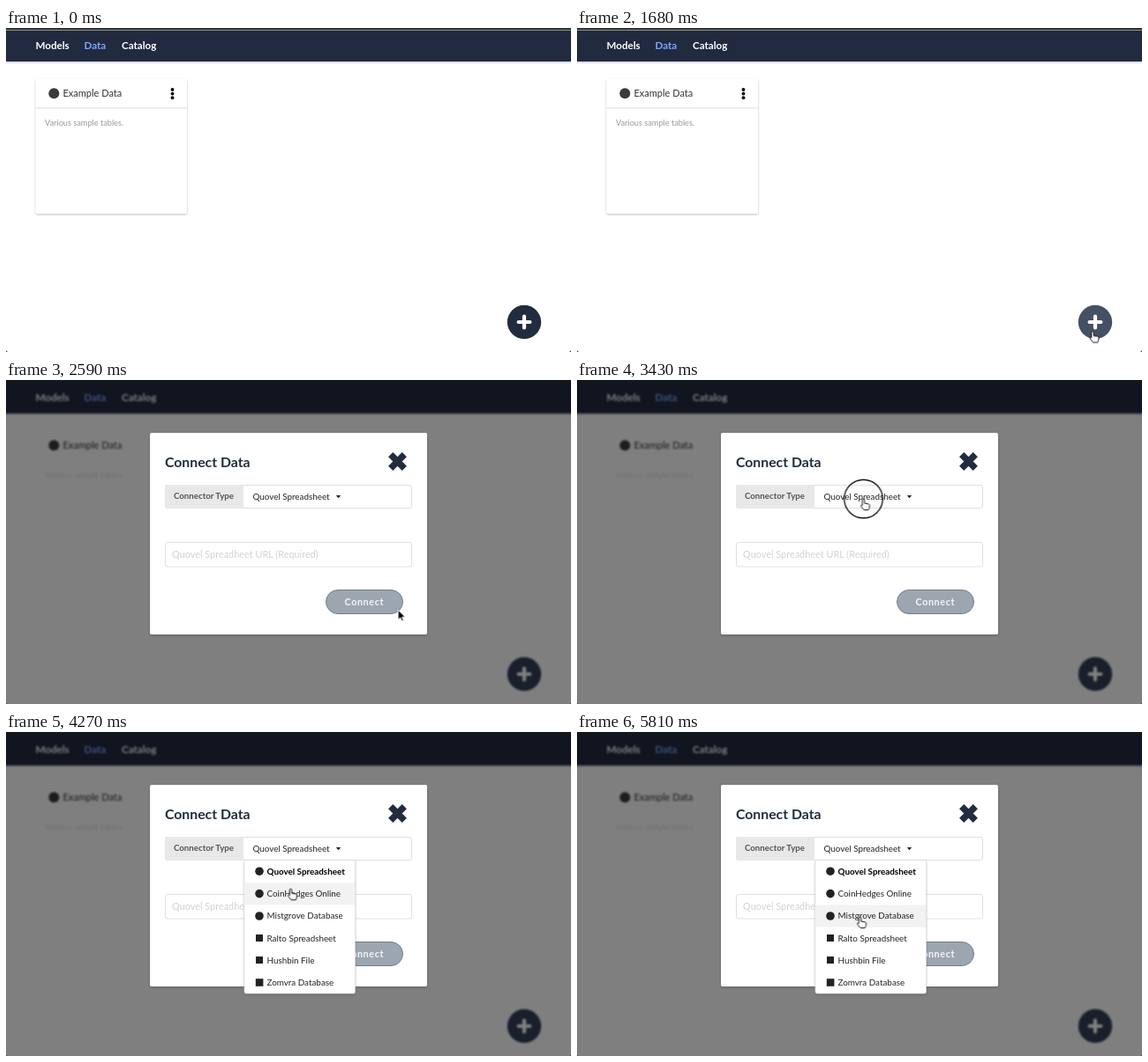
An HTML page for the animation above (6.02 s loop, 640 by 368 pixels).

```html
<!DOCTYPE html>
<html lang="en">
<head>
<meta charset="utf-8">
<title>Connect Data</title>
<style>
  html, body { margin: 0; width: 100%; height: 100%; overflow: hidden; background: #333; }
  svg { display: block; width: 640px; height: 368px; border-radius: 0 0 3px 3px; }
  text { font: 9.85px Lato, sans-serif; fill: #222; }
  .bold { font-weight: 700; }
  .nav { font-size: 11.6px; fill: #fff; }
  .title { font-size: 11px; fill: #333; }
  .note { font-size: 9.2px; fill: #999; }
  .heading { font-size: 15.8px; fill: #212c3f; }
  .label { font-size: 9.7px; fill: #555; }
  .hint { font-size: 10.9px; fill: #d2d2d2; }
  .action { font-size: 10.8px; letter-spacing: .6px; fill: #f4f5f6; }

  /* One shared 6020 ms clock; "cut" marks hard changes. */
  .cut, .move { animation: 6020ms infinite; }
  .cut { animation-timing-function: step-end; }
  .page { animation-name: blur; }
  .lit { animation-name: lit; }
  .note { animation-name: fade-note; }
  .modal { animation-name: modal; }
  .add { animation-name: add; fill: #212c3f; }
  .menu { animation-name: menu; transform-origin: 0 145px; }
  .cursor { animation-name: path; }
  .shown { animation-name: shown; }
  .arrow { animation-name: arrow; }
  .hand { animation-name: hand; }
  .ring { animation-name: ring; }
  .row { fill: #f2f2f2; opacity: 0; }
  .row1 { animation-name: row1; }
  .row2 { animation-name: row2; }
  .row3 { animation-name: row3; }

  @keyframes blur { 0% { filter: none } 29.06%, 100% { filter: blur(.9px) } }
  @keyframes lit { 0% { opacity: 1 } 29.06%, 100% { opacity: 0 } }
  @keyframes fade-note { 0% { opacity: 1 } 29.06%, 100% { opacity: .3 } }
  @keyframes modal { 0% { opacity: 0 } 29.06%, 100% { opacity: 1 } }
  @keyframes add {
    0%, 18.8% { fill: #212c3f }
    23.2%, 29% { fill: #445064 }
    29.06%, 100% { fill: #324056 }
  }
  @keyframes menu {
    0%, 58.8% { opacity: 0; transform: scaleY(.1) }
    61.6%, 100% { opacity: 1; transform: none }
  }
  @keyframes path {
    0%, 15.1% { transform: translate(604px, 361px) }
    17.44% { transform: translate(589px, 353px) }
    19.77% { transform: translate(586px, 349px) }
    23.2%, 36% { transform: translate(584px, 344.5px); animation-timing-function: ease-in }
    43% { transform: translate(445px, 262px); animation-timing-function: cubic-bezier(.2, .4, .5, 1) }
    55.8%, 63.9% { transform: translate(324.5px, 135px); animation-timing-function: ease-in }
    70.93% { transform: translate(322.5px, 178px); animation-timing-function: ease-out }
    79.07%, 82.5% { transform: translate(321px, 214px) }
    88.37%, 90.7% { transform: translate(320px, 212px) }
    93% { transform: translate(320.5px, 211px) }
    96.5%, 100% { transform: translate(320.5px, 210px) }
  }
  @keyframes shown { 0% { opacity: 0 } 15.1%, 100% { opacity: 1 } }
  @keyframes arrow { 0% { opacity: 1 } 19.76% { opacity: 0 } 29.06% { opacity: 1 } 52.3%, 100% { opacity: 0 } }
  @keyframes hand { 0% { opacity: 0 } 19.76% { opacity: 1 } 29.06% { opacity: 0 } 52.3%, 100% { opacity: 1 } }
  @keyframes ring {
    0% { opacity: 0 }
    25.57% { opacity: 1 }
    27.9% { opacity: 0 }
    56.97% { opacity: 1 }
    59.3%, 100% { opacity: 0 }
  }
  @keyframes row1 { 0% { opacity: 0 } 66.4% { opacity: 1 } 69.8%, 100% { opacity: 0 } }
  @keyframes row2 { 0% { opacity: 0 } 69.8% { opacity: 1 } 74.4%, 100% { opacity: 0 } }
  @keyframes row3 { 0% { opacity: 0 } 74.4%, 100% { opacity: 1 } }
</style>
</head>
<body>
<svg viewBox="0 0 640 368">
  <defs>
    <filter id="soft" x="-10%" y="-10%" width="120%" height="120%">
      <feDropShadow dx="0" dy="1" stdDeviation="1.3" flood-color="#22224a" flood-opacity=".3"/>
    </filter>
  </defs>

  <g class="page cut">
    <rect x="-10" y="-10" width="660" height="388" fill="#fff"/>
    <g filter="url(#soft)">
      <rect x="-10" y="-10" width="660" height="48" fill="#212c3f"/>
    </g>
    <rect x="-10" y="-10" width="660" height="12" fill="#29332f"/>
    <rect class="lit cut" y="2" width="640" height="1" fill="#8f9284"/>
    <text class="nav bold" x="33.5" y="24">Models</text>
    <text class="nav bold" x="88.5" y="24" style="fill:#78a6ff">Data</text>
    <text class="nav bold" x="131" y="24">Catalog</text>

    <g class="lit cut">
      <rect x="33.5" y="57.5" width="171.5" height="153.5" rx="3" fill="#fff" filter="url(#soft)"/>
      <path d="M33.5 91H205" stroke="#d9d9ec"/>
      <g fill="#000">
        <circle cx="188.5" cy="70" r="1.9"/>
        <circle cx="188.5" cy="74.6" r="1.9"/>
        <circle cx="188.5" cy="79.2" r="1.9"/>
      </g>
    </g>
    <circle cx="54.3" cy="74.2" r="6" fill="#3a3a3a"/>
    <text class="title" x="64.5" y="78">Example Data</text>
    <text class="note cut" x="44" y="111">Various sample tables.</text>

    <circle class="add move" cx="587" cy="334" r="19.2"/>
    <path d="M580.6 334H593.4M587 327.6V340.4" stroke="#fff" stroke-width="4.2" stroke-linecap="round"/>
  </g>

  <g class="modal cut">
    <rect width="640" height="368" opacity=".5"/>
    <rect x="163" y="60" width="314" height="229" rx="2" fill="#fff" filter="url(#soft)"/>
    <text class="heading bold" x="180" y="98.7">Connect Data</text>
    <path d="M435.7 84.7L451.3 100.3M451.3 84.7L435.7 100.3" stroke="#212c3f" stroke-width="7.4"/>

    <g fill="none" stroke="#dfdfdf">
      <rect x="180.5" y="119.5" width="279" height="26" rx="2.5"/>
      <rect x="180.5" y="184.5" width="279" height="27.5" rx="2.5"/>
    </g>
    <path d="M269 119V146H183a3 3 0 0 1-3-3V122a3 3 0 0 1 3-3Z" fill="#e8e8e8"/>
    <text class="label bold" x="190" y="135.4">Connector Type</text>
    <text x="279.5" y="136">Quovel Spreadsheet</text>
    <path d="M373.8 131H379.2L376.5 134.2Z" fill="#222"/>
    <text class="hint" x="188" y="202">Quovel Spreadheet URL (Required)</text>

    <rect x="362.5" y="238.5" width="87" height="27" rx="13.5" fill="#9ca6b1" stroke="#737c88"/>
    <text class="action bold" x="383.5" y="256">Connect</text>

    <g class="menu move">
      <rect x="270" y="145.5" width="125.5" height="151.5" rx="2" fill="#fff" stroke="#d8d8d8" stroke-width=".6" filter="url(#soft)"/>
      <g class="rows">
        <rect class="row row1 cut" x="270.5" y="146" width="124.5" height="25.2"/>
        <rect class="row row2 cut" x="270.5" y="171.2" width="124.5" height="25.2"/>
        <rect class="row row3 cut" x="270.5" y="196.4" width="124.5" height="25.2"/>
      </g>
      <g fill="#222">
        <circle cx="287" cy="158.2" r="4.8"/>
        <circle cx="287" cy="183.6" r="4.8"/>
        <circle cx="287" cy="209" r="4.8"/>
        <rect x="283" y="230" width="8" height="8"/>
        <rect x="283" y="255" width="8" height="8"/>
        <rect x="282.8" y="280.2" width="8.6" height="8.6"/>
      </g>
      <text class="bold" x="295.5" y="161.6" style="fill:#000">Quovel Spreadsheet</text>
      <text x="295.5" y="187.2">CoinHedges Online</text>
      <text x="295.5" y="212.4">Mistgrove Database</text>
      <text x="295.5" y="237.6">Ralto Spreadsheet</text>
      <text x="295.5" y="262.6">Hushbin File</text>
      <text x="295.5" y="287.8">Zomvra Database</text>
    </g>
  </g>

  <g class="shown cut">
    <g class="cursor move">
      <circle class="ring cut" r="21.8" fill="none" stroke="#111" stroke-width="1.4"/>
      <path class="arrow cut" d="M0 0V11.2L2.6 8.8L4.3 12.6L6.1 11.8L4.4 8.1H8Z" fill="#000" stroke="#fff" stroke-width=".9"/>
      <path class="hand cut" d="M-1.2 1.2a1.2 1.2 0 0 1 2.4 0V5l4.2.8c1.3.3 1.8 1 1.7 2l-.5 2.6-.9 2.2H.6L-2.8 8.4c-.6-1.1.6-1.9 1.6-1.1Z" fill="#fff" stroke="#000" stroke-width=".9" stroke-linejoin="round"/>
    </g>
  </g>
</svg>
</body>
</html>
```
